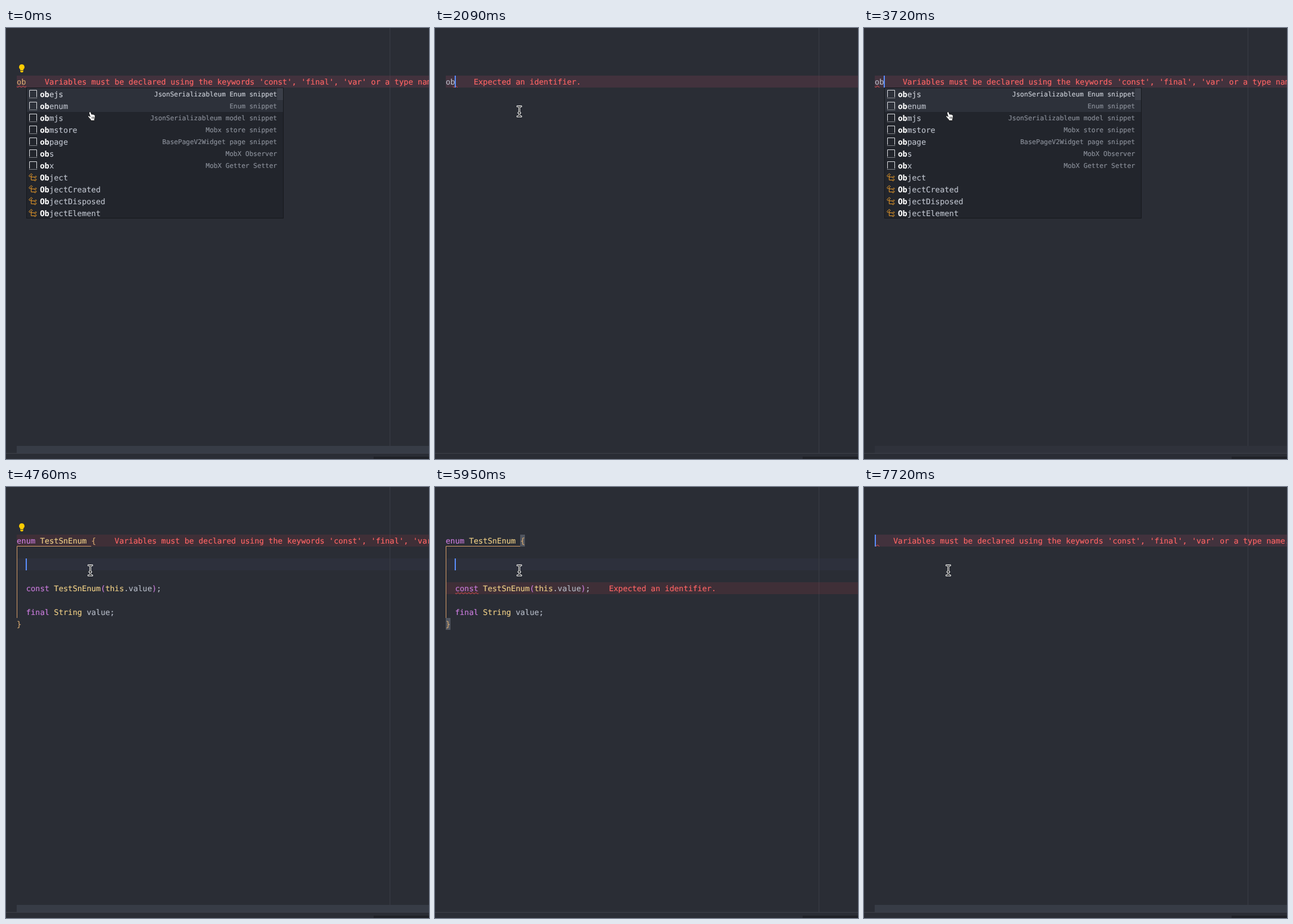
An HTML page that plays this animation: 710x724 px, repeating every 8 s.

```html
<!DOCTYPE html>
<html lang="en">
<head>
<meta charset="utf-8">
<title>Snippet completion</title>
<style>
  html, body { margin: 0; width: 100%; height: 100%; overflow: hidden; background: #2a2d35; }
  svg { display: block; width: 710px; height: 724px; }
  text {
    font: 13px "DejaVu Sans Mono", monospace;
    white-space: pre; text-rendering: geometricPrecision; color: #b4bac6;
  }
  text, tspan { fill: currentColor; stroke: currentColor; stroke-width: .15px; }
  .key { color: #c97bdc; }
  .type { color: #efcf86; }
  .str { color: #a3cf87; }
  .tan { color: #d6a870; }
  .arg { font-style: italic; }
  .err { color: #ff6565; }
  .hit { color: #fff; font-weight: bold; }
  .label { color: #bcc1cb; }
  .detail { color: #8c919b; font-size: .85em; font-size: 11.05px; text-anchor: end; }
  .chosen .label, .chosen .detail { color: #cdd1d9; }
  .guide { fill: none; stroke: #d19a66; }
  .timed { animation: 8s step-end infinite; }
</style>
</head>
<body>
<script>
const LOOP = 8000;
const CHAR = 7.826;
const LEFT = 18;
const BASELINE = 14.5;
const ERROR_TINT = 'rgb(235 70 75 / .11)';
const CURRENT_LINE = '#2d303c';
const rules = [];

// Shows the body only during the given "start-end" spans (ms).
function during(spans, body) {
  const name = `show${rules.length}`;
  const stops = spans.split(' ').flatMap(span => {
    const [start, end] = span.split('-');
    return [[start, 1], [end, 0]];
  });
  const frames = [[0, 0], ...stops]
    .map(([time, opacity]) => `${time / LOOP * 100}%{opacity:${opacity}}`).join('');
  rules.push(`@keyframes ${name}{${frames}}`);
  return `<g class="timed" style="animation-name:${name}">${body}</g>`;
}

const rect = (x, y, w, h, fill) =>
  `<rect x="${x}" y="${y}" width="${w}" height="${h}" fill="${fill}"/>`;
const band = (y, fill, h = 20) => rect(LEFT, y, 710 - LEFT, h, fill);
const caret = (x, y) => rect(x, y, 2, 20, '#5a8dfa');

// Spans are "class|text" pairs; rows are placed by their top edge.
function line(top, ...spans) {
  const parts = spans.map(span => {
    const cut = span.indexOf('|');
    return `<tspan class="${span.slice(0, cut)}">${span.slice(cut + 1)}</tspan>`;
  });
  return `<text x="${LEFT}" y="${top + BASELINE}">${parts.join('')}</text>`;
}

const wave = `<pattern id="wave" width="6" height="3" patternUnits="userSpaceOnUse">
  <path d="M0 1.3L1.7 2.7L4.7 .3L6 1.3" fill="none" stroke="#e8504f"/></pattern>`;
const squiggle = (x, top, width) =>
  `<rect width="${width}" height="3" fill="url(#wave)" transform="translate(${x} ${top + 17})"/>`;

const VARIABLES = "Variables must be declared using the keywords 'const', 'final', 'var' or a type name.";
const IDENTIFIER = 'Expected an identifier.';
const lens = (column, message, top = 80) =>
  `<text class="err" x="${LEFT + (column + 4) * CHAR}" y="${top + BASELINE}">${message}</text>`;

function enumBlock(top, bracketSpans, errorSpans) {
  return during(errorSpans, band(top + 80, ERROR_TINT) + lens(31, IDENTIFIER, top + 80)
      + squiggle(34, top + 80, 39))
    + during(bracketSpans, rect(143, top, 8, 20, '#50555f') + rect(18, top + 140, 8, 20, '#50555f'))
    + `<path class="guide" d="M143 ${top + 19.5}H18.5V${top + 140}"/>`
    + line(top, 'key|enum', 'type| TestSnEnum ', 'tan|{')
    + line(top + 80, 'key|  const', 'type| TestSnEnum', 'key|(', 'type|this', '|.value', 'key|)', '|;')
    + line(top + 120, 'key|  final', 'type| String', '| value;')
    + line(top + 140, 'tan|}');
}

const jsonHeader =
  line(80, 'key|import ', "str|'package:dependencies/json_annotation/json_annotation.dart'", '|;')
  + line(120, 'tan|@', 'type|JsonEnum', 'tan|(', 'arg|valueField', 'key|: ', 'str|"value"', 'tan|)');

const snippetIcon = y =>
  `<g fill="none" stroke="#d8dade"><path d="M39.5 ${y + 15}V${y + 3.5}H51.5V${y + 15}"/>
   <path d="M39 ${y + 16.5}H52" stroke-dasharray="1 1"/></g>`;
const classIcon = y =>
  `<path transform="translate(37 ${y + 2})" fill="none" stroke="#ee9d28"
   d="M3.3 7.2L1.5 5.4L5.4 1.5L7.2 3.3ZM5.3 5.3V12.4H10.6M5.3 7.3H10.6M10.5 8L13 5.5L14.2 6.7L11.7 9.2ZM10.5 13L13 10.5L14.2 11.7L11.7 14.2Z"/>`;

const suggestions = [
  ['obejs', 'JsonSerializableum Enum snippet'], ['obenum', 'Enum snippet'],
  ['obmjs', 'JsonSerializableum model snippet'], ['obmstore', 'Mobx store snippet'],
  ['obpage', 'BasePageV2Widget page snippet'], ['obs', 'MobX Observer'],
  ['obx', 'MobX Getter Setter'], ['Object'], ['ObjectCreated'], ['ObjectDisposed'], ['ObjectElement'],
];
const menu = `<rect x="34.5" y="100.5" width="431" height="219" fill="#22252c" stroke="#17191e"/>`
  + rect(35, 101, 430, 40, '#2d313a')
  + rect(455, 101, 10, 20, '#3a3e48')
  + suggestions.map(([label, detail], i) => {
    const y = 101 + i * 20;
    return `<g class="${i ? '' : 'chosen'}">${(detail ? snippetIcon : classIcon)(y)}
      <text x="57" y="${y + BASELINE}"><tspan class="hit">${label.slice(0, 2)}</tspan><tspan class="label">${label.slice(2)}</tspan></text>
      <text class="detail" x="455" y="${y + 14}">${detail || ''}</text></g>`;
  }).join('');

const bulb = `<path fill="#ffcc00" d="M26.5 61a4.6 4.6 0 0 1 2.7 8.3V71.2H23.8V69.3A4.6 4.6 0 0 1 26.5 61ZM24 72H29V73.2L28 74.5H25L24 73.2Z"/>`;

const beamPath = 'M138.3 131.5H139.5Q141.5 131.5 141.5 133.5V146.5Q141.5 148.5 139.5 148.5H138.3M144.7 131.5H143.5Q141.5 131.5 141.5 133.5M141.5 146.5Q141.5 148.5 143.5 148.5H144.7M140 142.5H143';
const beam = `<g fill="none" stroke-linecap="round"><path d="${beamPath}" stroke="#fff" stroke-width="3"/>
  <path d="${beamPath}" stroke="#111" stroke-width="1.1"/></g>`;
const hand = `<path transform="translate(137 140)" fill="#fff" stroke="#111" stroke-width=".8" stroke-linejoin="round"
  d="M3.2 1.2Q4.7.2 5.4 2L6.6 5.2Q7.6 4.3 8.6 5.3Q9.8 4.7 10.6 5.9Q12.2 5.6 12.5 7.6Q13 11 11.6 13V15.6H5.6L5.3 14Q3 11.5.8 8.9Q.2 7.3 2 7.3L4.3 9L2.4 3Q2.2 1.8 3.2 1.2Z"/>
  <path d="M144.3 149V152.5M146.3 149V152.5M148 149V152.5" stroke="#111" stroke-width=".7"/>`;

const MENU_OPEN = '0-150 3570-4620';

const scene = [
  during('0-150 2090-4620 6840-8000', band(80, CURRENT_LINE)),
  during('150-2090', band(180, CURRENT_LINE)),
  during('4620-6840', band(120, CURRENT_LINE)),
  rect(644, 0, 1, 714, '#393c45'),
  during('0-600 2090-5200 6840-8000', band(80, ERROR_TINT)),

  during('150-2090', jsonHeader + enumBlock(140, '450-2090', '600-2090')),
  during('4620-6840', enumBlock(80, '4770-6840', '5200-6840')),

  during('2090-2680 3570-3870 6840-7140', line(80, '|ob')),
  during('0-150 2680-3130 3870-4620 7140-7430', line(80, 'tan|ob')),
  during('3130-3280 3430-3570 7430-7570', line(80, '|o')),

  during('2090-2390 6840-6990', lens(2, IDENTIFIER) + squiggle(30, 80, 8)),
  during('0-150 2390-3130 3570-4620 6990-7430', lens(2, VARIABLES)),
  during('3130-3280 3430-3570 7430-7570', lens(1, VARIABLES)),
  during('3280-3430 7570-8000', lens(0, VARIABLES)),
  during('150-600', lens(67, VARIABLES)),
  during('4620-5200', lens(17, VARIABLES)),
  during('0-150 2390-3130 3870-4620 6990-7430', squiggle(18, 80, 16)),
  during('3130-3870 7430-8000', squiggle(18, 80, 8)),

  during('2090-2540 3570-4170 6840-7280', caret(33, 80)),
  during('3130-3280 3430-3570 7430-7570', caret(26, 80)),
  during('3280-3430 7570-8000', caret(18, 80)),
  during('150-750 1200-1640', caret(33, 180)),
  during('4620-5350 5950-6390', caret(33, 120)),

  during('0-600 2830-3130 4170-5200 7280-7430', bulb),
  during('3720-3870', band(702, '#2f323b', 12)),
  during('0-600 3870-5650 7720-8000', band(702, '#373c46', 12)),
  rect(0, 714, 710, 1, '#3d4049'),
  rect(617, 720, 93, 4, '#1f2127'),

  during(MENU_OPEN, menu + hand),
  during('150-3570 4620-8000', beam),
].join('');

document.body.innerHTML =
  `<svg viewBox="0 0 710 724"><style>${rules.join('')}</style>${wave}${scene}</svg>`;
</script>
</body>
</html>
```
